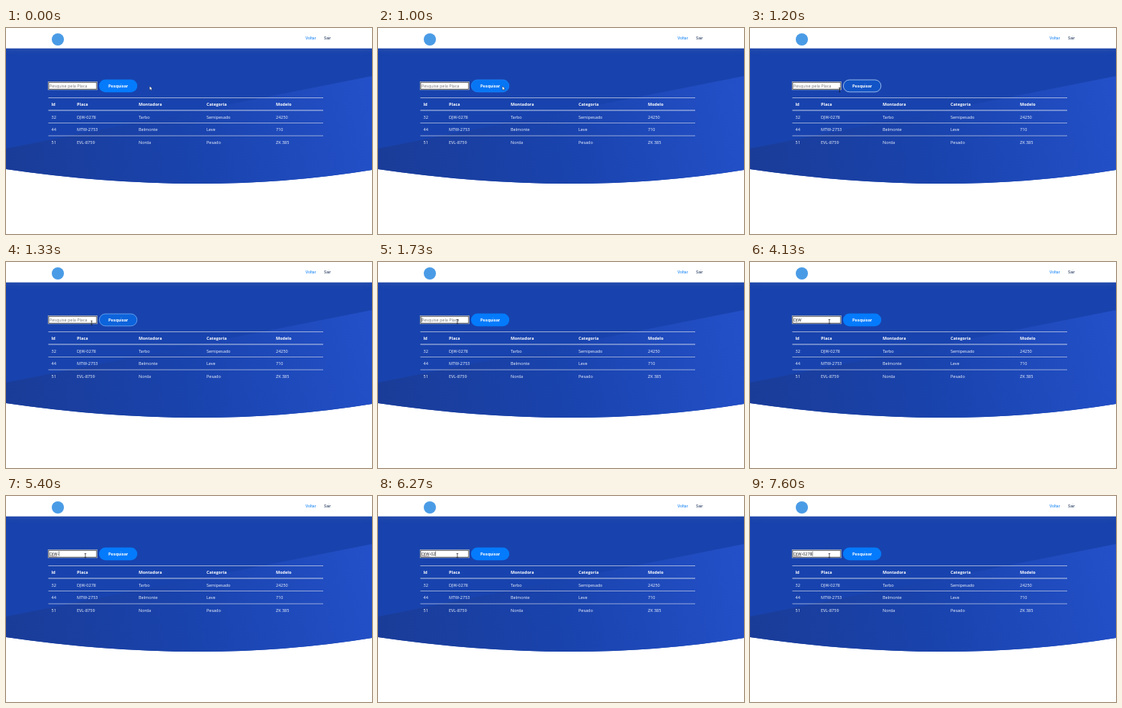
An HTML page with a canvas for the animation above (8000 ms loop, 480 by 270 pixels).

```html
<!DOCTYPE html>
<html lang="pt-BR">
<head>
<meta charset="utf-8">
<title>Pesquisa por placa</title>
<style>
html, body { margin: 0; width: 100%; height: 100%; overflow: hidden; background: #fff; }
canvas { display: block; width: 480px; height: 270px; }
</style>
</head>
<body>
<canvas id="stage" width="480" height="270"></canvas>
<script>
const ctx = document.getElementById('stage').getContext('2d');
const LOOP = 8000;
const BODY = '"Open Sans", sans-serif';
const HEADING = 'Inter, sans-serif';
const INPUT_FONT = '5.45px ' + BODY;

const columns = [59.5, 93, 174, 263, 354];
const heads = ['Id', 'Placa', 'Montadora', 'Categoria', 'Modelo'];
const rows = [
  ['32', 'DJW-0278', 'Tarbo', 'Semipesado', '24250'],
  ['44', 'MTW-2753', 'Belmonte', 'Leve', '710'],
  ['51', 'EVL-8759', 'Norda', 'Pesado', 'ZK 385']
];

const plate = 'DJW-0278';
const keyTimes = [3070, 3270, 3600, 4340, 5930, 6270, 7270, 7540];
const caretResets = [1730, 2670, ...keyTimes];
const BLINK = 530;

// Pointer stops: time, x, y
const path = [
  [0, 188.5, 76.5], [70, 188.5, 76.5], [730, 178, 78], [930, 178, 78],
  [1000, 163.5, 76.5], [1200, 117.5, 81], [1530, 104, 78], [LOOP, 104, 78]
];

const clamp = v => Math.max(0, Math.min(1, v));
const smooth = v => v * v * (3 - 2 * v);
const mix = (a, b, k) => a + (b - a) * k;

function text(str, x, y, font, color, align = 'left') {
  ctx.font = font;
  ctx.fillStyle = color;
  ctx.textAlign = align;
  ctx.fillText(str, x, y);
}

function rect(x, y, w, h, color) {
  ctx.fillStyle = color;
  ctx.fillRect(x, y, w, h);
}

function pointerAt(t) {
  let i = 0;
  while (i < path.length - 2 && t >= path[i + 1][0]) i++;
  const [t0, x0, y0] = path[i], [t1, x1, y1] = path[i + 1];
  const k = clamp((t - t0) / (t1 - t0));
  return [mix(x0, x1, k), mix(y0, y1, k)];
}

function drawHero() {
  ctx.save();
  ctx.beginPath();
  ctx.moveTo(0, 20);
  ctx.lineTo(480, 20);
  ctx.lineTo(480, 186);
  ctx.quadraticCurveTo(256, 222.5, 0, 185);
  ctx.clip();
  rect(0, 0, 480, 270, '#1843ae');

  // Tilted panel, dark on the left and bright on the right
  const shade = ctx.createLinearGradient(0, 190, 480, 100);
  shade.addColorStop(0, '#1a3c98');
  shade.addColorStop(0.5, '#1943ad');
  shade.addColorStop(1, '#2350c8');
  ctx.fillStyle = shade;
  ctx.beginPath();
  ctx.moveTo(480, 63);
  ctx.lineTo(0, 158);
  ctx.lineTo(0, 270);
  ctx.lineTo(480, 270);
  ctx.fill();
  ctx.restore();
}

function drawHeader() {
  ctx.save();
  ctx.shadowColor = 'rgba(127,137,161,.3)';
  ctx.shadowBlur = 8;
  rect(0, 0, 480, 26.7, '#fff');
  ctx.restore();
  ctx.fillStyle = '#4a9be6';
  ctx.beginPath();
  ctx.arc(68, 15, 8, 0, Math.PI * 2);
  ctx.fill();
  text('Voltar', 392.7, 15.2, '500 4.9px ' + HEADING, '#1a86f5');
  text('Sair', 417, 15.2, '500 4.9px ' + HEADING, '#283d62');
}

function drawTable() {
  heads.forEach((h, i) => text(h, columns[i], 101.8, 'bold 5.5px ' + BODY, '#fff'));
  rows.forEach((row, r) => {
    const y = 118.7 + r * 16.6;
    row.forEach((cell, i) => text(cell, columns[i], y, '5.5px ' + BODY, '#f4f7ff'));
  });
  rect(55.5, 91.3, 360.5, 0.7, '#d3d9ea');
  rect(55.5, 107.5, 360.5, 0.9, '#d3d9ea');
  rect(55.5, 124.2, 360.5, 0.7, '#c3cbe3');
  rect(55.5, 140.8, 360.5, 0.7, '#c3cbe3');
}

function drawInput(t) {
  rect(54.9, 70.2, 65, 11, '#d5d9e0');
  rect(55.5, 70.8, 63.8, 9.8, '#24272f');
  rect(56.3, 71.6, 62.2, 8.2, '#fff');

  const typed = plate.slice(0, keyTimes.filter(k => t >= k).length);
  if (typed) text(typed, 57, 77.7, INPUT_FONT, '#16181c');
  else text('Pesquise pela Placa', 57, 77.7, INPUT_FONT, '#757575');

  ctx.font = INPUT_FONT;
  if (t >= 4600) {
    rect(57, 78.7, ctx.measureText('DJW').width, 0.6, '#6d4a52');
  }
  const last = caretResets.filter(k => t >= k).pop();
  if (last !== undefined && (t - last) % (2 * BLINK) < BLINK) {
    rect(57.1 + ctx.measureText(typed).width, 72.6, 0.5, 6.2, '#111');
  }
}

function drawButton(t) {
  const hover = 0.7 * (t < 1180 ? smooth(clamp((t - 950) / 230))
                                : 1 - smooth(clamp((t - 1180) / 350)));
  ctx.beginPath();
  ctx.roundRect(122, 67.6, 50.2, 16.6, 8.3);
  ctx.fillStyle = `rgb(${mix(4, 24, hover)},${mix(123, 67, hover)},${mix(252, 174, hover)})`;
  ctx.fill();
  if (hover > 0) {
    ctx.beginPath();
    ctx.roundRect(122.4, 68, 49.4, 15.8, 7.9);
    ctx.strokeStyle = `rgba(255,255,255,${hover})`;
    ctx.lineWidth = 0.8;
    ctx.stroke();
  }
  text('Pesquisar', 147.1, 77.8, 'bold 5.3px ' + HEADING, '#fff', 'center');
}

function drawPointer(t) {
  const [x, y] = pointerAt(t);
  if (x < 120) {
    rect(x - 0.3, y - 2.8, 0.7, 5.8, '#1b1d22');
    rect(x - 1.2, y - 3, 2.5, 0.6, '#1b1d22');
    rect(x - 1.2, y + 2.6, 2.5, 0.6, '#1b1d22');
    return;
  }
  ctx.save();
  ctx.translate(x, y);
  ctx.beginPath();
  [[0, 0], [0, 4.4], [1, 3.5], [1.7, 5], [2.4, 4.7], [1.8, 3.2], [3.1, 3.1]]
    .forEach(p => ctx.lineTo(...p));
  ctx.closePath();
  ctx.strokeStyle = '#0b1433';
  ctx.lineWidth = 0.8;
  ctx.stroke();
  ctx.fillStyle = '#fff';
  ctx.fill();
  ctx.restore();
}

function frame() {
  const t = performance.now() % LOOP;
  rect(0, 0, 480, 270, '#fff');
  drawHero();
  drawHeader();
  drawTable();
  drawInput(t);
  drawButton(t);
  drawPointer(t);
  requestAnimationFrame(frame);
}
frame();
</script>
</body>
</html>
```
